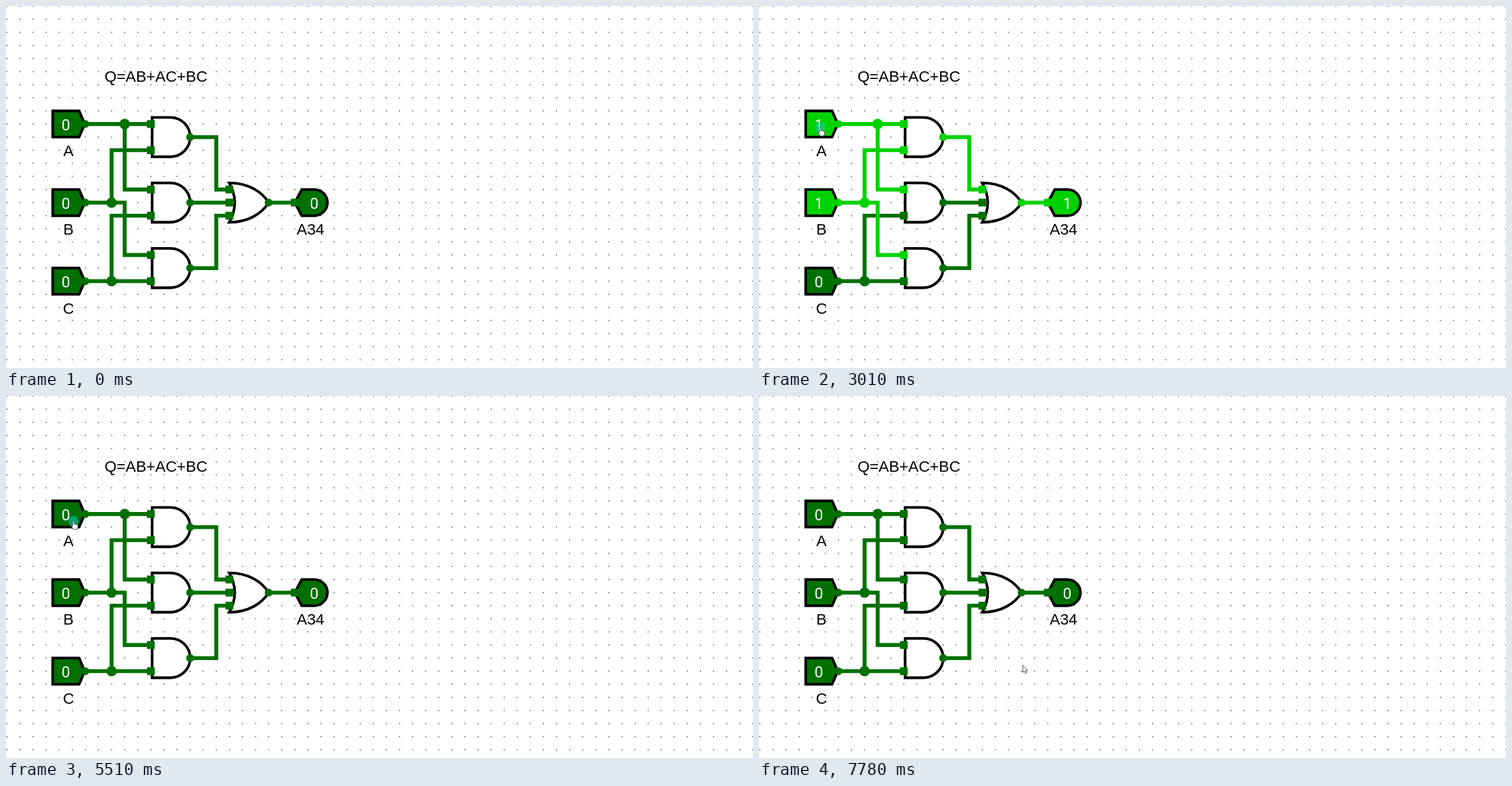
Write an HTML page with a canvas that moves like this. It is 1076 px wide and 521 px high and loops after 8 s.

```html
<!DOCTYPE html>
<html lang="en">
<head>
<meta charset="utf-8">
<title>Majority circuit</title>
<style>
  html, body { margin: 0; height: 100%; overflow: hidden; background: #fff; }
  canvas { display: block; }
</style>
</head>
<body>
<canvas id="stage" width="1076" height="521"></canvas>
<script>
const ctx = document.getElementById('stage').getContext('2d');
const LOOP = 8000, UNIT = 18.85;
const LOW = '#007000', HIGH = '#00d200';
const LABEL = '22.3px "Liberation Sans", Arial, sans-serif';
const DIGIT = '22px Roboto, Arial, sans-serif';
const gx = n => 1.3 + n * UNIT;
const gy = n => 0.2 + n * UNIT;
const tone = on => on ? HIGH : LOW;

// start time, inputs ABC, pointer x, y, look
const steps = [
  [0, '000', 0, 0, 'none'],
  [500, '000', 250, 416, 'arrow'],
  [750, '000', 150, 290, 'arrow'],
  [1010, '000', 89, 177, 'press'],
  [1260, '100', 89, 178, 'hand'],
  [1510, '100', 90, 183, 'arrow'],
  [1760, '100', 85, 274, 'arrow'],
  [2010, '100', 87, 281, 'press'],
  [2260, '110', 87, 281, 'hand'],
  [2760, '110', 88, 232, 'arrow'],
  [3010, '110', 88, 175, 'press'],
  [3260, '010', 88, 176, 'hand'],
  [3510, '010', 88, 300, 'arrow'],
  [3760, '010', 89, 394, 'press'],
  [4010, '011', 89, 395, 'hand'],
  [4510, '011', 89, 396, 'press'],
  [4760, '010', 89, 396, 'hand'],
  [5010, '010', 90, 284, 'press'],
  [5260, '000', 90, 284, 'hand'],
  [5510, '000', 97, 180, 'press'],
  [5780, '100', 97, 180, 'hand'],
  [6030, '100', 86, 398, 'press'],
  [6280, '101', 79, 409, 'arrow'],
  [6780, '101', 86, 398, 'press'],
  [7030, '100', 86, 398, 'hand'],
  [7280, '100', 90, 176, 'press'],
  [7530, '000', 90, 176, 'hand'],
  [7780, '000', 380, 388, 'arrow']
];

function text(str, x, y, font = LABEL, color = '#000') {
  ctx.font = font;
  ctx.fillStyle = color;
  ctx.fillText(str, x, y);
}

// points in grid units: x, y, x, y, ...
function wire(on, ...p) {
  ctx.beginPath();
  for (let i = 0; i < p.length; i += 2) ctx.lineTo(gx(p[i]), gy(p[i + 1]));
  ctx.lineWidth = 5.6;
  ctx.strokeStyle = tone(on);
  ctx.stroke();
}

function dot(on, x, y, r = 5.6) {
  ctx.beginPath();
  ctx.arc(gx(x), gy(y), r, 0, 7);
  ctx.fillStyle = tone(on);
  ctx.fill();
}

function pin(on, x, y) {
  ctx.fillStyle = tone(on);
  ctx.fillRect(gx(x) - 5.6, gy(y) - 5.6, 11.2, 11.2);
}

function outline(path, fill) {
  ctx.lineWidth = 3.8;
  ctx.strokeStyle = '#000';
  ctx.fillStyle = fill;
  ctx.fill(path);
  ctx.stroke(path);
}

function input(label, on, row) {
  const y = gy(row);
  outline(new Path2D(`M67.3 ${y - 18.85}H105.3L113.5 ${y}L105.3 ${y + 18.85}H67.3Z`), tone(on));
  dot(on, 6, row);
  text(+on, 86.2, y + 9.2, DIGIT, '#fff');
  text(label, 90, y + 46.5);
}

function andGate(a, b, row) {
  const y = gy(row), r = 28.3;
  outline(new Path2D(`M210.5 ${y - r}H237A${r} ${r} 0 0 1 237 ${y + r}H210.5Z`), '#fff');
  pin(a, 11, row - 1);
  pin(b, 11, row + 1);
  dot(a && b, 14, row);
}

function orGate(ins, row) {
  const y = gy(row), r = 28.3;
  outline(new Path2D(`M321.5 ${y - r}C350 ${y - r} 369 ${y - 15} 378.3 ${y}` +
    `C369 ${y + 15} 350 ${y + r} 321.5 ${y + r}Q337.5 ${y} 321.5 ${y - r}Z`), '#fff');
  ins.forEach((on, i) => pin(on, 17, row - 1 + i));
  dot(ins.some(Boolean), 20, row);
}

function output(label, on, row) {
  const y = gy(row), r = 18.85;
  outline(new Path2D(`M416 ${y}L426 ${y - r}H444.2A${r} ${r} 0 0 1 444.2 ${y + r}H426Z`), tone(on));
  pin(on, 22, row);
  text(+on, 444, y + 9.2, DIGIT, '#fff');
  text(label, 438.6, y + 46.5);
}

const arrow = new Path2D('M0 0V10L2.3 8L4 11.5L5.4 10.8L3.9 7.4H6.6Z');
const hand = new Path2D('M-1 0Q0-1 1 0V4L5 5Q7 5.5 6.6 8L5.6 12H0L-3 7Q-3 5.5-1 7Z');

function pointer(x, y, look) {
  if (look === 'none') return;
  ctx.save();
  ctx.translate(x, y);
  if (look === 'press') {
    ctx.beginPath();
    ctx.arc(0, 0, 7.5, 0, 7);
    ctx.fillStyle = 'rgba(0, 215, 210, .5)';
    ctx.fill();
  }
  const shape = look === 'arrow' ? arrow : hand;
  ctx.lineWidth = 1;
  ctx.strokeStyle = '#555';
  ctx.fillStyle = '#fff';
  ctx.fill(shape);
  ctx.stroke(shape);
  ctx.restore();
}

function draw(now) {
  const t = now % LOOP;
  const [, bits, x, y, look] = steps.findLast(s => s[0] <= t);
  const [a, b, c] = [...bits].map(v => v === '1');
  const ab = a && b, ac = a && c, bc = b && c, q = ab || ac || bc;

  ctx.fillStyle = '#fff';
  ctx.fillRect(0, 0, 1076, 521);
  ctx.fillStyle = '#666';
  for (let i = 0; i < 58; i++)
    for (let j = 0; j < 28; j++)
      ctx.fillRect(gx(i) - 0.8, gy(j) - 0.8, 1.6, 1.6);

  ctx.textAlign = 'center';
  ctx.lineCap = 'round';
  ctx.lineJoin = 'miter';

  wire(b, 8, 15, 8, 11, 11, 11);
  wire(c, 8, 21, 8, 16, 11, 16);
  wire(a, 6, 9, 11, 9);
  wire(a, 9, 9, 9, 14, 11, 14);
  wire(b, 6, 15, 9, 15, 9, 19, 11, 19);
  wire(c, 6, 21, 11, 21);
  wire(ab, 14, 10, 16, 10, 16, 14, 17, 14);
  wire(ac, 14, 15, 17, 15);
  wire(bc, 14, 20, 16, 20, 16, 16, 17, 16);
  wire(q, 20, 15, 22, 15);
  dot(a, 9, 9, 7.5);
  dot(b, 8, 15, 7.5);
  dot(c, 8, 21, 7.5);

  input('A', a, 9);
  input('B', b, 15);
  input('C', c, 21);
  andGate(a, b, 10);
  andGate(a, c, 15);
  andGate(b, c, 20);
  orGate([ab, ac, bc], 15);
  output('A34', q, 15);
  text('Q=AB+AC+BC', 216, 109);
  pointer(x, y, look);
}

const start = performance.now();
function tick() {
  draw(performance.now() - start);
  requestAnimationFrame(tick);
}
tick();
</script>
</body>
</html>
```
